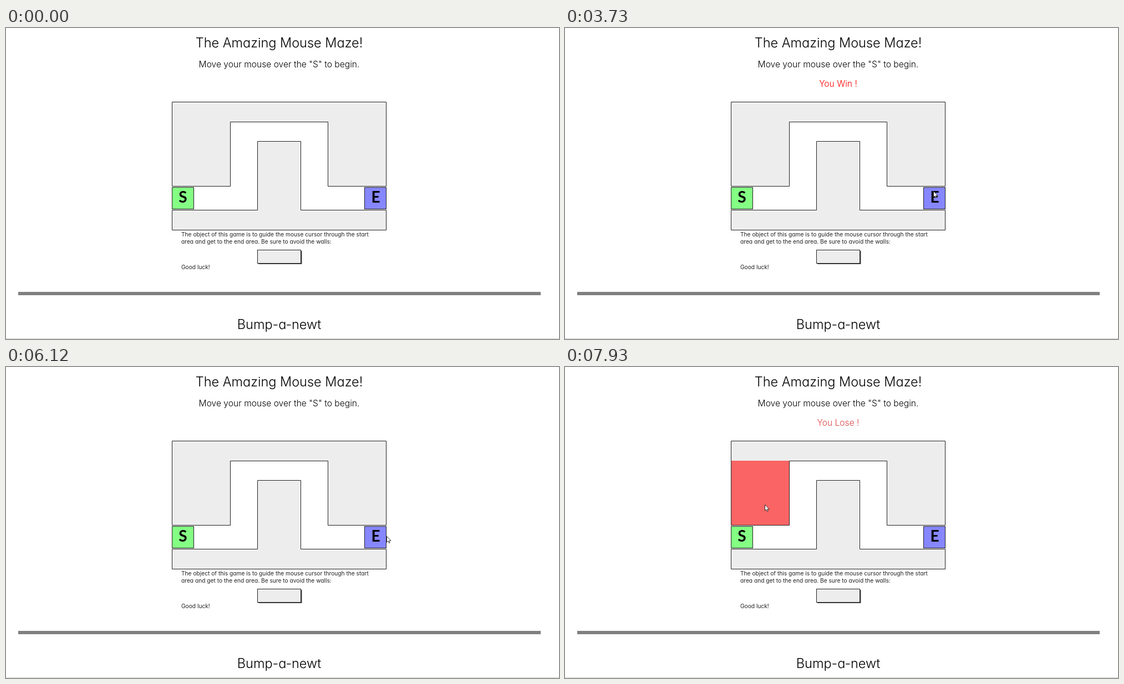
Write an HTML page that moves like this. It is 997 px wide and 561 px high and loops after 8000 ms.

```html
<!DOCTYPE html>
<html lang="en">
<head>
<meta charset="utf-8">
<title>Mouse Maze</title>
<style>
  html, body { margin: 0; width: 100%; height: 100%; overflow: hidden; background: #fff; }
  svg { display: block; width: 997px; height: 561px; }
  text {
    font-family: Inter, Lato, sans-serif;
    font-feature-settings: "cv11";
    font-optical-sizing: none;
    fill: #000;
  }
  .mid { text-anchor: middle; }
  .title { font-size: 23.5px; font-weight: 300; }
  .sub { font-size: 15.6px; font-weight: 350; }
  .note { font-size: 10.2px; fill: #222; }
  .mark { font: 700 28px Lato, sans-serif; }
  .wall { fill: #ededed; }
  .line { fill: none; stroke: #222; }
</style>
</head>
<body>
<svg viewBox="0 0 997 561">
  <defs>
    <path id="top" d="M299.5 133.5H685.5V285.5H580.5V169.5H404.5V285.5H299.5Z"/>
    <path id="base" d="M299.5 328.5H453.5V204.5H531.5V328.5H685.5V364.5H299.5Z"/>
  </defs>

  <text class="mid title" x="492.5" y="35">The Amazing Mouse Maze!</text>
  <text class="mid sub" x="492.5" y="71">Move your mouse over the "S" to begin.</text>
  <text class="mid sub" id="msg" x="492.5" y="106"></text>

  <use class="wall" href="#top"/>
  <use class="wall" href="#base"/>
  <rect id="hit" x="299.5" y="169" width="105" height="116.5" fill="#fa6464"/>
  <use class="line" href="#top"/>
  <use class="line" href="#base"/>

  <rect x="299.5" y="287.5" width="39" height="39" fill="#84ff84" stroke="#222"/>
  <rect x="646.5" y="287.5" width="39" height="39" fill="#8686ff" stroke="#222"/>
  <text class="mid mark" x="319" y="315">S</text>
  <text class="mid mark" x="666.5" y="315">E</text>

  <text class="note" x="316" y="376">The object of this game is to guide the mouse cursor through the start</text>
  <text class="note" x="316" y="389">area and get to the end area. Be sure to avoid the walls:</text>
  <rect x="455" y="402" width="78.5" height="24" fill="#444"/>
  <rect x="453.5" y="400.5" width="78" height="24" fill="#ededed" stroke="#222"/>
  <text class="note" x="316" y="435">Good luck!</text>

  <rect x="22" y="476" width="942" height="6" fill="#808080"/>
  <text class="mid title" x="492.5" y="543">Bump-a-newt</text>
  <rect y="560" width="997" height="1" fill="#ccc"/>

  <path id="cursor" d="M.5 .5V11.2L2.9 9L4.6 12.6L6.2 11.9L4.6 8.4H8Z"
        fill="#fff" stroke="#222" stroke-width=".9" stroke-linejoin="round"/>
</svg>
<script>
  const LOOP = 8000, START = 150, STEP = 77.5;

  // Pointer path: [step, x, y]
  const path = [
    [0, 815, 548], [4, 307, 293], [5, 340, 298], [9, 332, 293], [11, 330, 299],
    [15, 330, 299], [21, 419, 304], [23, 432, 285], [26, 437, 189], [33, 525, 186],
    [35, 556, 195], [40, 558, 300], [46, 664, 294], [49, 764, 350], [52, 560, 474],
    [54, 330, 465], [56, 236, 325], [57, 309, 311], [59, 305, 308], [62, 222, 250],
    [64, 260, 105], [68, 600, 95], [71, 794, 200], [73, 770, 300], [77, 686, 305],
    [79, 665, 303], [83, 765, 400], [85, 640, 480], [88, 330, 480], [90, 185, 420],
    [92, 190, 320], [94, 314, 300], [98, 345, 298], [100, 360, 248]
  ];

  // Message shown from a step onwards
  const messages = [
    [45, "You Win !"], [59, ""],
    [79, "Don't cheat, you should start from the 'S' and move to the 'E' inside the maze!"],
    [95, ""], [99, "You Lose !"]
  ];

  const [msg, hit, cursor] = ["msg", "hit", "cursor"].map(id => document.getElementById(id));
  const mix = (a, b, p) => a + (b - a) * p;

  function pointAt(k) {
    const i = Math.max(1, path.findIndex(p => p[0] >= k));
    const [k0, x0, y0] = path[i - 1], [k1, x1, y1] = path[i];
    const p = Math.max(0, (k - k0) / (k1 - k0));
    return [mix(x0, x1, p), mix(y0, y1, p)];
  }

  function draw(t) {
    const k = Math.min(100, Math.floor((t - START) / STEP));
    const [x, y] = pointAt(k).map(Math.round);
    cursor.style.display = k < 0 ? "none" : "";
    cursor.setAttribute("transform", `translate(${x} ${y})`);

    const label = messages.filter(m => m[0] <= k).pop()?.[1] ?? "";
    if (msg.textContent !== label) msg.textContent = label;

    // The message pulses between red and a duller red
    const pulse = (1 - Math.cos((START + k * STEP - 3715) / 1800 * 2 * Math.PI)) / 2;
    const dim = Math.round(mix(0, 92, pulse));
    msg.style.fill = `rgb(${Math.round(mix(255, 205, pulse))},${dim},${dim})`;

    hit.style.display = k >= 99 ? "" : "none";
  }

  const begin = performance.now();
  function tick() {
    draw((performance.now() - begin) % LOOP);
    requestAnimationFrame(tick);
  }
  tick();
</script>
</body>
</html>
```
